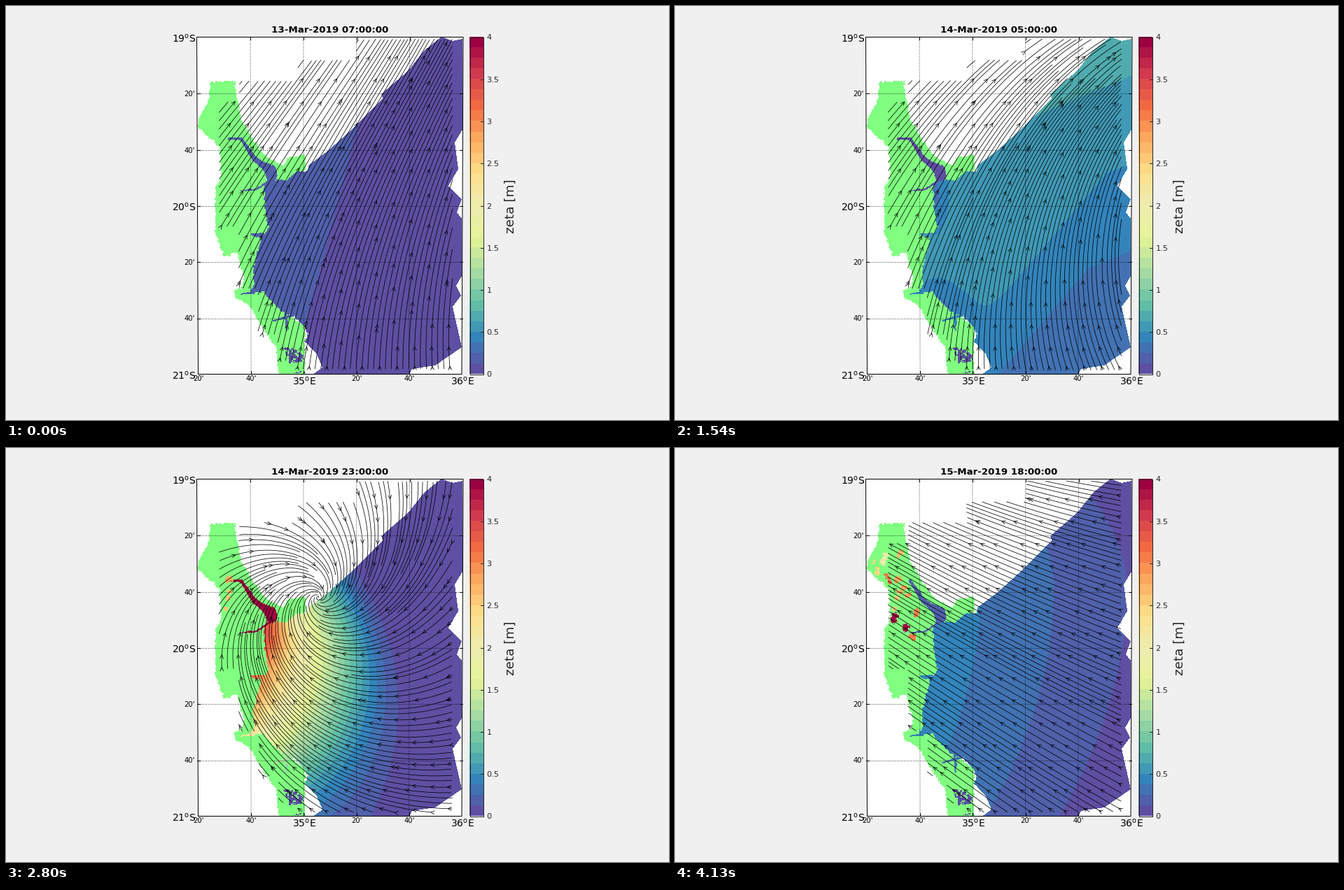
These frames come from a looping animation (947x592 px, 4.2 s). A matplotlib script:

```python
import numpy as np
import matplotlib
import matplotlib.pyplot as plt
from matplotlib.animation import FuncAnimation
from matplotlib.collections import LineCollection
from matplotlib.path import Path

FRAMES, INTERVAL = 60, 70
KEYS = [0, 10, 22, 32, 40, 53, 59]
PX = 0.72  # points per pixel at 100 dpi
LEVELS = 32
ramp = np.linspace(0, 1, LEVELS)
shade = 1 - 0.06 * np.exp(-((ramp - 0.5) / 0.07) ** 2)
SPECTRAL = matplotlib.colormaps["Spectral_r"](ramp)
SPECTRAL[:, :3] *= shade[:, None]
PALETTE = (SPECTRAL * 255).astype(np.uint8)
GREEN = (128, 255, 128, 255)
INK = "#262626"

plt.rcParams["font.family"] = "DejaVu Sans"
rng = np.random.default_rng(19)

# ---------- map raster ----------
LEFT, RIGHT, TOP, BOTTOM = 272, 654, 44, 527
X, Y = np.meshgrid(np.arange(LEFT, RIGHT) + 0.5, np.arange(TOP, BOTTOM) + 0.5)


def blocks(size, amp):
    """Blocky noise that roughens the edges of the mesh."""
    h, w = X.shape
    n = rng.uniform(-amp, amp, (h // size + 1, w // size + 1))
    return np.kron(n, np.ones((size, size)))[:h, :w]


NX, NY = blocks(3, 1.5), blocks(3, 1.5)


def inside(points, rough=1.0):
    q = np.c_[(X + rough * NX).ravel(), (Y + rough * NY).ravel()]
    return Path(points).contains_points(q).reshape(X.shape)


def stroke(*points):
    """Pixels near a polyline of (x, y, half width) points."""
    hit = np.zeros(X.shape, bool)
    for (x0, y0, w0), (x1, y1, w1) in zip(points, points[1:]):
        dx, dy = x1 - x0, y1 - y0
        t = np.clip(((X - x0) * dx + (Y - y0) * dy) / (dx * dx + dy * dy), 0, 1)
        far = np.hypot(X + NX * 0.5 - x0 - t * dx, Y + NY * 0.5 - y0 - t * dy)
        hit |= far < w0 + t * (w1 - w0)
    return hit


COAST = [(622, 44), (597, 64), (575, 92), (536, 126), (538, 132), (500, 171),
         (460, 207), (432, 228), (430, 236), (418, 236), (400, 249), (390, 249),
         (374, 245), (368, 262), (370, 290), (375, 318), (364, 333), (353, 375),
         (355, 397), (347, 410), (367, 409), (398, 441), (412, 443), (432, 468),
         (427, 480), (444, 498), (452, 517), (438, 527)]
OFFSHORE = [(576, 527), (580, 519), (613, 514), (651, 488), (638, 430), (650, 414),
            (643, 400), (651, 386), (651, 304), (644, 295), (651, 276), (632, 257),
            (646, 233), (641, 195), (652, 177), (652, 47), (638, 50)]
LAND = [(292, 109), (326, 107), (335, 158), (352, 190), (372, 216), (396, 228),
        (402, 217), (427, 213), (428, 233), (385, 262), (378, 325), (360, 400),
        (427, 460), (427, 527), (389, 527), (386, 490), (361, 450), (348, 428),
        (328, 418), (326, 407), (337, 403), (340, 388), (330, 352), (312, 359),
        (299, 325), (299, 258), (308, 245), (304, 200), (274, 174), (274, 162),
        (288, 139)]
MARSH = [(396, 489), (412, 491), (426, 500), (424, 509), (404, 510), (402, 500)]

land = inside(LAND)
river = stroke((318, 190, 1.5), (336, 190, 2), (355, 219, 3.5), (367, 227, 5),
               (378, 235, 8), (379, 242, 8))
river |= stroke((335, 264, 1), (358, 262, 1.2), (376, 250, 2))
creeks = stroke((382, 450, 1.2), (404, 444, 2), (416, 440, 1))
creeks |= stroke((398, 436, 1), (401, 452, 2), (400, 465, 1))
creeks |= stroke((352, 327, 2), (367, 328, 4))
creeks |= stroke((336, 412, 1), (353, 410, 2))
sea = inside(COAST + OFFSHORE, np.where(X < 432, 1, 0)) | creeks
marsh = inside(MARSH) & (blocks(2, 1) > -0.6)
marsh |= stroke((414, 524, 1), (426, 524, 1))

# flooded ground: x, y, level; each one wets in turn and spreads a few pools
FLOODS = [(319, 186, 2.75), (318, 215, 2.6), (330, 257, 3.95), (315, 240, 3.95),
          (345, 239, 3.0), (341, 271, 3.1), (327, 199, 2.8), (305, 186, 3.2),
          (319, 155, 2.7), (298, 160, 2.1), (290, 172, 2.4)]
POOLS = []
for x, y, _ in FLOODS:
    pool = np.zeros(X.shape, bool)
    for dx, dy in [(0, 0)] + list(rng.normal(0, (2.5, 6), (2, 2))):
        pool |= np.hypot(X + NX - x - dx, Y + NY - y - dy) < rng.uniform(2.5, 4.5)
    POOLS.append(pool & land & ~sea)

# ---------- water level ----------


def bump(x, y, rx, ry):
    return np.exp(-((X - x) / rx) ** 2 - ((Y - y) / ry) ** 2)


def bow(x, y, above, below):
    """Distance west of a curved front with its apex at (x, y)."""
    return x - np.where(Y < y, above, below) * (Y - y) ** 2 - X


def sloping():
    z = np.clip(0.5 - (X + 0.85 * Y - 820) * 0.0014, 0.27, 0.6)
    z = np.maximum(z, 0.625 + 0.001 * (100 + 0.42 * (651 - X) - Y))
    return z - 0.25 * bump(370, 270, 22, 60) - 0.25 * bump(375, 430, 42, 42)


def ridge():
    dx, dy = X - 430, Y - 240
    a, b = 0.89 * dx - 0.45 * dy, 0.45 * dx + 0.89 * dy
    z = 1.2 * np.exp(-(a / 235) ** 2 - (b / np.where(b > 0, 200, 120)) ** 2)
    return np.maximum(z - 0.0009 * np.maximum(0, X - 560), 0.14)


def surge():
    t = np.maximum(bow(560, 370, 0.0016, 0.0016) / 180, 0)
    peak = np.clip(3.1 - (Y - 280) * 0.0105, 0.5, 3.1)
    z = 0.125 + peak * t ** 1.25 + 0.4 * bump(375, 255, 25, 30)
    return np.where(t > 0, z, 0)


SEA = [
    0.125 + (500 - 0.26 * (Y - 180) - X) * 0.001,
    np.maximum(0.7 - 0.01 * (X - 372 + 0.6 * np.abs(Y - 240)), 0)
    + 0.25 * bump(352, 396, 18, 22),
    sloping(),
    ridge(),
    surge(),
    0.125 + 0.0029 * bow(475, 360, 0.0025, 0.001),
    0.125 + 0.0012 * bow(645, 200, 0.003, 0.0009),
]
RIVER = [0.18, 0.7, 0.03, 0.9, 3.95, 0.3, 0.22]
TIDE = [0.3, 0.4, 0, 0, 0, 0]


def between(i):
    k = min(np.searchsorted(KEYS, i, side="right") - 1, len(KEYS) - 2)
    return k, (i - KEYS[k]) / (KEYS[k + 1] - KEYS[k])


def water(i):
    k, w = between(i)
    z = (1 - w) * np.maximum(SEA[k], 0) + w * np.maximum(SEA[k + 1], 0)
    tide = TIDE[k] * np.sin(np.pi * w) ** 2
    z = z + tide * (1 - (X - 350) / 600)
    stream = river & ((X > 334) | (i < 46))
    z[stream] = np.interp(i, KEYS, RIVER) + tide
    wet = sea | stream
    for n, (pool, (*_, height)) in enumerate(zip(POOLS, FLOODS)):
        if i >= 39 + n:
            z[pool] = height
            wet = wet | pool
    z[marsh] = 0
    wet = wet | marsh
    img = np.zeros(X.shape + (4,), np.uint8)
    img[land] = GREEN
    band = np.clip((z * LEVELS / 4).astype(int), 0, LEVELS - 1)
    img[wet] = PALETTE[band[wet]]
    return img


# ---------- wind ----------
W0, W1, H0, H1 = 304, 638, 47, 521
CELL = 2
WX, WY = np.meshgrid(np.arange(W0, W1 + 4, CELL) + 1.0,
                     np.arange(H0, H1 + 4, CELL) + 1.0)


def limits(x):
    """Top and bottom of the stepped wind grid at x."""
    c = (x - W0) // 28
    top = H0 + 29.7 * (3 - (c >= 1) - (c >= 4) - (c >= 7))
    return top, H1 - 205 * (1 - min(c, 4) / 4) ** 2


LIMITS = [limits(x) for x in range(W0, W1 + 1)]


def corners(tl, tr, bl, br, power):
    """Wind angle in degrees spread between the four corners."""
    s = (WX - W0) / (W1 - W0)
    t = np.clip((WY - H0) / (H1 - H0), 0, 1) ** power
    return (tl + (tr - tl) * s) * (1 - t) + (bl + (br - bl) * s) * t


def vortex(i):
    """Clockwise inward spiral around the moving storm centre."""
    stops = KEYS[2:6]
    cx = np.interp(i, stops, [870, 690, 446, 250])
    cy = np.interp(i, stops, [260, 210, 214, 130])
    up = cy - WY
    return np.degrees(np.arctan2(cx - WX, up)) - 41 - 8 * np.tanh(up / 80)


def easterly():
    a = 179 + 28 * np.cos((WY - 125) / 400 * np.pi)
    east = np.clip((WX - 460) / 170, 0, 1)
    high = np.clip((350 - WY) / 120, 0, 1)
    return a - 36 * high * east


EASTERLY = easterly()
WIND = [corners(47, 62, 75, 95, 1.5), corners(94, 62, 108, 92, 0.8),
        corners(40, 30, 75, 118, 0.9), vortex, vortex, EASTERLY,
        corners(158, 174, 140, 150, 0.6)]


def wind(i):
    k, w = between(i)
    total = 0
    for src, weight in ((WIND[k], 1 - w), (WIND[k + 1], w)):
        angle = src(i) if callable(src) else src
        total = total + weight * np.exp(1j * np.radians(angle))
    total = total / np.maximum(np.abs(total), 1e-6)
    return total.real.tolist(), (-total.imag).tolist()


SX, SY = (W1 - W0) / 40, (H1 - H0) / 40  # seed cells
EX, EY = SX / 3, SY / 3                  # cells that stop a line
AX, AY = SX * 3, SY * 2.7                # one arrow per cell


def streamlines(i):
    u, v = wind(i)
    seeded, ends, arrows = set(), set(), set()
    lines = []

    def trace(x, y, sign, last):
        pts = []
        for _ in range(500):
            if not W0 <= x <= W1:
                break
            top, low = LIMITS[int(x) - W0]
            if not top <= y <= low:
                break
            dx, dy = x - W0, H1 - y
            cell = (int(dx / EX), int(dy / EY))
            if cell != last:
                if cell in ends:
                    break
                ends.add(cell)
                last = cell
            pts.append((x, y))
            seeded.add((int(dx / SX), int(dy / SY)))
            r, c = int((y - H0) / CELL), int((x - W0) / CELL)
            p, q = u[r][c], v[r][c]
            spot = (int(dx / AX), int(dy / AY))
            if spot not in arrows:
                arrows.add(spot)
                bx, by = x - 5.5 * p, y - 5.5 * q
                lines.append([(bx - 2.5 * q, by + 2.5 * p), (x, y),
                              (bx + 2.5 * q, by - 2.5 * p)])
            x += sign * 2 * p
            y += sign * 2 * q
        return pts

    for row in range(40):
        for col in range(40):
            if (col, row) in seeded:
                continue
            x, y = W0 + (col + 0.5) * SX, H1 - (row + 0.5) * SY
            top, low = LIMITS[int(x) - W0]
            if not top <= y <= low:
                continue
            home = (int((x - W0) / EX), int((H1 - y) / EY))
            ends.add(home)
            ahead = trace(x, y, 1, home)
            path = trace(x, y, -1, home)[:0:-1] + ahead
            if len(path) > 2:
                lines.append(path)
    return lines


# ---------- stage ----------
fig = plt.figure(figsize=(9.47, 5.92), dpi=100, facecolor="#f0f0f0")
ax = fig.add_axes([0, 0, 1, 1])
ax.axis("off")


def line(xs, ys, **kw):
    ax.plot(xs, ys, **{"color": "black", "lw": PX, "zorder": 2, **kw})


def label(x, y, s, size, **kw):
    ax.text(x, y, s, fontsize=size * PX, **{"color": "black", "va": "center", **kw})


FRAME = [(272.5, 44.5), (653, 44.5), (651, 526.5), (274.5, 526.5)]
ax.fill(*zip(*FRAME), color="white", lw=0)
picture = ax.imshow(water(0), extent=(LEFT, RIGHT, BOTTOM, TOP),
                    interpolation="nearest", aspect="auto", zorder=1)
line(*zip(*(FRAME + FRAME[:1])), zorder=4)

DEGREE = r"$^{\mathrm{o}}$"
DOTS = dict(ls=(0, (1, 2)), lw=0.85 * PX)
for n in range(1, 6):
    x0, x1, y = 273.3 + 75.8 * n, 274.9 + 75.2 * n, 45 + 80.3 * n
    if n < 5:
        line([x0, x1], [44, 526], **DOTS)
        line([x0, x0], [44, 48])
        line([x1, x1], [522, 526])
    line([273, 652], [y, y], **DOTS)
    line([273, 277], [y, y])
    line([648, 652], [y, y])
for n in range(7):
    y = 47 + 80.3 * n
    if n % 3 == 0:
        label(271, y, f"{19 + n // 3}{DEGREE}S", 14, ha="right")
    else:
        label(270, y - 1, f"{n % 3 * 20}'", 10, ha="right")
for n in range(6):
    x = 275 + 75.2 * n
    if n % 3 == 2:
        label(x + 1, 537, f"{35 + n // 3}{DEGREE}E", 14, ha="center")
    else:
        label(x, 533, f"{(n + 1) % 3 * 20}'", 10, ha="center")

# colour bar
ax.imshow(PALETTE[::-1, None], extent=(662, 682, 526.5, 44.5),
          interpolation="nearest", aspect="auto", zorder=1)
line([662.5, 681.5, 681.5, 662.5, 662.5], [44.5, 44.5, 526.5, 526.5, 44.5], color=INK)
for n in range(9):
    y = 526.5 - n * 60.25
    line([677.5, 681.5], [y, y], color=INK)
    label(686.5, y, f"{n / 2:g}", 11.3, color=INK, va="center_baseline")
label(721, 286, "zeta [m]", 18.4, color=INK, rotation=90, ha="center")

title = ax.text(462.5, 34, "", fontsize=13.4 * PX, weight="bold", ha="center",
                va="center")
flow = LineCollection([], colors="black", linewidths=0.75 * PX, zorder=3)
ax.add_collection(flow, autolim=False)
ax.set_xlim(0, 947)
ax.set_ylim(592, 0)


def draw(i):
    hour = 7 + i
    title.set_text(f"{13 + hour // 24}-Mar-2019 {hour % 24:02d}:00:00")
    picture.set_data(water(i))
    flow.set_segments(streamlines(i))
    return picture, flow, title


anim = FuncAnimation(fig, draw, frames=FRAMES, interval=INTERVAL, repeat=True,
                     repeat_delay=0, blit=False)
plt.show()
```
